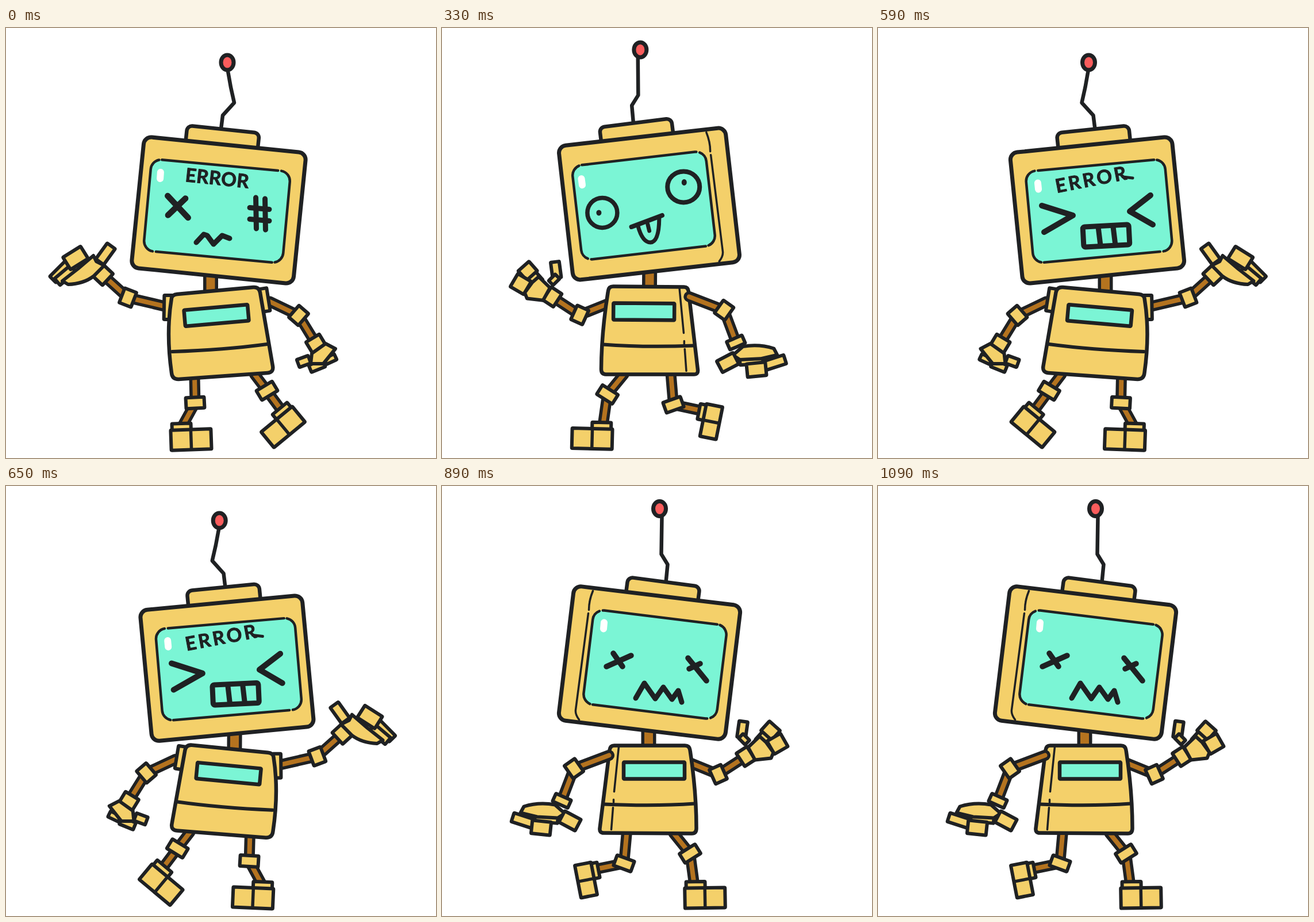
These frames come from a looping animation (748x748 px, 1.19 s). An HTML page:

```html
<!DOCTYPE html>
<html>
<head>
<meta charset="utf-8">
<style>
html, body { margin: 0; width: 100%; height: 100%; overflow: hidden; background: #fff; }
svg { display: block; width: 100vw; height: 100vh; }
path, rect { stroke-linecap: round; stroke-linejoin: round; }
text { font: 700 33px Lato, "Open Sans", sans-serif; fill: #1f2123; stroke: #1f2123; stroke-linejoin: round; }
</style>
</head>
<body>
<svg id="stage" viewBox="0 0 748 748"></svg>
<script>
const INK = '#1f2123', GOLD = '#f4d06a', TEAL = '#7bf5d5', BROWN = '#b4731f', RED = '#fa5c5c';

// Basic marks; boxes are placed by their centre and turned in degrees.
const path = (d, w = 6, fill = 'none', color = INK) =>
  `<path d="M${d}" fill="${fill}" stroke="${color}" stroke-width="${w}"/>`;
const box = (x, y, w, h, turn = 0, { r = 1, line = 6, fill = GOLD, extra = '' } = {}) =>
  `<rect x="${x - w / 2}" y="${y - h / 2}" width="${w}" height="${h}" rx="${r}" fill="${fill}" stroke="${INK}"
    stroke-width="${line}" transform="rotate(${turn} ${x} ${y})" ${extra}/>`;
const oval = (x, y, rx, ry, line, fill = 'none') =>
  `<ellipse cx="${x}" cy="${y}" rx="${rx}" ry="${ry}" fill="${fill}" stroke="${INK}" stroke-width="${line}"/>`;
const dash = (x, y, length, turn, w = 9.5) => {
  const a = turn * Math.PI / 180, dx = Math.cos(a) * length / 2, dy = Math.sin(a) * length / 2;
  return path(`${x - dx},${y - dy}L${x + dx},${y + dy}`, w);
};
const label = (x, y, turn, spacing) =>
  `<text transform="translate(${x} ${y}) rotate(${turn})" letter-spacing="${spacing}">ERROR</text>`;
const shine = (x, y, turn) => box(x, y, 12, 23, turn, { r: 6, line: 0, fill: '#fff' });

// Robot parts
const limb = (d, w = 19) => path(d, w) + path(d, w - 11, 'none', BROWN);

// Limb from a root through joints [x, y, turn]; a joint with a turn wears a cuff.
function chain(along, across, root, ...joints) {
  const stops = [root, ...joints];
  return joints.map((p, i) => limb(`${stops[i].slice(0, 2)}L${p.slice(0, 2)}`)).join('') +
    joints.map(([x, y, turn]) => turn === undefined ? '' : box(x, y, along, across, turn)).join('');
}
const arm = (...stops) => chain(22, 27, ...stops);
const leg = (...stops) => chain(19, 32, ...stops);

// The ankle sits over the heel, on the side given by heel = -1 or 1.
const foot = (x, y, turn, heel, size = 1) =>
  `<g transform="translate(${x} ${y}) rotate(${turn})">` +
  box(heel * 16 * size, -22 * size, 33 * size, 13) + box(0, 0, 70 * size, 35 * size) +
  path(`0,${-17 * size}V${17 * size}`, 5.5) + '</g>';

const cap = (x, y, turn) => box(x, y, 126, 40, turn, { r: 9, line: 6.5 });
const head = (x, y, w, h, turn) => box(x, y, w, h, turn, { r: 13, line: 7 });
const screen = (x, y, w, h, turn) => box(x, y, w, h, turn,
  { r: 18, line: 4.5, fill: TEAL, extra: 'pathLength="768" stroke-dasharray="201 6 172 5 201 6 172 5"' });
const antenna = (rod, x, y) => path(rod, 6.5) + oval(x, y, 11, 13, 7, RED);
const panel = (x, y, w, h, turn) => box(x, y, w, h, turn, { fill: TEAL, line: 6.5 });
const mirror = (body, width, dy = 0) =>
  `<g transform="translate(${width} ${dy}) scale(-1 1)">${body}</g>`;

const leaning =
  leg([328, 606], [329, 652, 87], [307, 692]) + foot(322, 716, -2, -1) +
  leg([432, 602], [454, 631, 59], [480, 666]) + foot(482, 694, -39.5, 1) +
  // left arm and hand
  arm([280, 485], [212, 469, 21], [169, 430, 43]) +
  box(173, 393, 34, 17, -54) + box(95, 424, 38, 15, -45) + box(103, 430, 36, 15, -40) +
  box(121, 400, 36, 25, -32) + path('98,440L125,419L152,396L157,406L171,413L152,432Q135,445 108,446Z', 6, GOLD) +
  // right arm and hand
  arm([459, 476], [509, 500, 41], [539, 549, 59]) +
  box(518, 580, 21, 14, -20) + box(541, 588, 26, 13, -22) + box(564, 576, 20, 11, -25) +
  path('532,566L556,549L573,558L552,584L530,584Z', 6, GOLD) +
  // torso
  limb('356,430V460', 26) + box(282, 486, 14, 42, 1) + box(450, 473, 13, 40, -9) +
  path('298,463L430,451Q440,450 442,460L464,588Q466,599 455,600L300,611Q289,611 288,600Q278,530 288,470Q289,464 298,463Z', 6.5, GOLD) +
  path('289,563Q380,560 454,550') + panel(366, 500, 111, 28, -5) +
  // head
  antenna('386,75L391,103L397,130L377,152L374,176', 385, 60) +
  cap(376, 196, 6) + head(370, 317, 283, 229, 5.8) + screen(367, 318.5, 243, 160, 5.3);

const striding =
  leg([316, 602], [287, 638, 122], [280, 690]) + foot(261, 715, 1, 1) +
  leg([397, 600], [402, 655, 70], [446, 664]) + foot(468, 684, -79, 1, 0.82) +
  // left arm and hand
  box(196, 422, 15, 28, -8) + box(193, 439, 16, 11, -45) +
  arm([292, 478], [238, 500, 24], [190, 469, 33]) +
  box(160, 438, 18, 20, -42) + box(147, 424, 25, 22, -42) + box(135, 447, 27, 26, 30) +
  path('142,462L155,444L166,434L186,453L174,475L146,472Z', 6, GOLD) +
  // torso
  limb('359,422V454', 26) +
  path('296,450H419Q426,450 427,458L444,594Q445,602 437,602L284,603Q276,603 276,594Q276,530 287,458Q288,450 296,450Z', 6.5, GOLD) +
  path('411,452L419,530M420,544V549M421,558L424,596', 3.5) +
  path('279,551Q350,556 437,552') + panel(349.5, 493.5, 106, 29, 0) +
  // right arm and hand
  arm([428, 467], [489, 490, 35], [510, 545]) +
  box(576, 581, 41, 16, -18) + box(537, 577, 40, 13, -5) + box(546, 593, 33, 23, -6) +
  path('505,568L522,553Q550,548 576,556L582,567L553,574L517,576Z', 6, GOLD) +
  box(496, 581, 32, 22, -28) + box(510, 546, 15, 29, 66) +
  // head
  antenna('336,52L337,117L326,135L329,166', 340, 38) +
  cap(335, 185, -7.5) + head(357.5, 306, 292, 235, -6.9) +
  path('456,181Q463,198 463,214M464,220L486,388Q487,396 480,405', 3.5) +
  screen(348, 309, 234, 165, -7);

const crossFace = shine(268.5, 256.5, 4) + label(311, 267, 6, 0.5) +
  dash(299, 311, 52, 47, 10.5) + dash(297, 311, 42, -44, 10.5) +
  [-1, 1].map(s => dash(443 + 8 * s, 323 + s, 54, 89, 9) + dash(441, 324 + 10 * s, 34, 5, 9)).join('') +
  path('331,373L344,359L350,361L361,376L376,361L389,366', 9);

const goofyFace = shine(240, 268.5, -8) +
  oval(276, 322, 26, 26, 7.5) + oval(417, 276, 28, 27, 8) +
  oval(270, 322, 2, 2.5, 5) + oval(418, 268, 2, 3, 5) +
  path('338,344Q346,373 360,373Q375,372 375,331', 7) +
  dash(353.5, 336, 57, -21, 8) + dash(356.5, 347, 12, 76, 7);

const squintFace = shine(278.5, 275, -6) + label(311, 287, -11, 4) +
  path('426,259L443,261', 5) +
  path('285,309L339,326L289,355M474,291L438,319L478,342', 10) +
  box(397, 361.5, 80, 35, -3, { r: 3, line: 9 , fill: TEAL }) +
  [385, 411].map(x => dash(x, 362, 30, 83, 9)).join('');

const dizzyFace = shine(281.5, 243, 5) +
  dash(307.5, 304.5, 47, -24) + dash(306, 302.5, 28, 55) +
  dash(444, 319, 51, 51) + dash(439.5, 313.5, 21, -25) +
  path('337,369L352,343L371,370L385,350L400,371L411,356L417,376', 9);

const poses = [
  { at: 0, rest: 200, art: leaning + crossFace },
  { at: 300, rest: 160, art: striding + goofyFace },
  { at: 590, rest: 200, art: mirror(leaning, 751.5) + squintFace },
  { at: 890, rest: 200, art: mirror(striding, 718.5, 1.5) + dizzyFace }
];
const LOOP = 1190, HOLD = 30, STEPS = 3;

const stage = document.getElementById('stage');
stage.innerHTML = poses.map(p => `<g>${p.art}</g>`).join('');
const groups = [...stage.children];

function draw() {
  const t = performance.now() % LOOP;
  const now = poses.findLastIndex(p => t >= p.at);
  const { at, rest } = poses[now], age = t - at;
  // A short, stepped, fading wobble between two still holds.
  const step = Math.floor((age - HOLD) / (rest - HOLD) * STEPS);
  const tilt = step >= 0 && step < STEPS ? 0.4 * (-0.7) ** step : 0;
  groups.forEach((g, i) => g.style.display = i === now ? '' : 'none');
  groups[now].setAttribute('transform', `rotate(${tilt} 360 735)`);
  requestAnimationFrame(draw);
}
draw();
</script>
</body>
</html>
```
